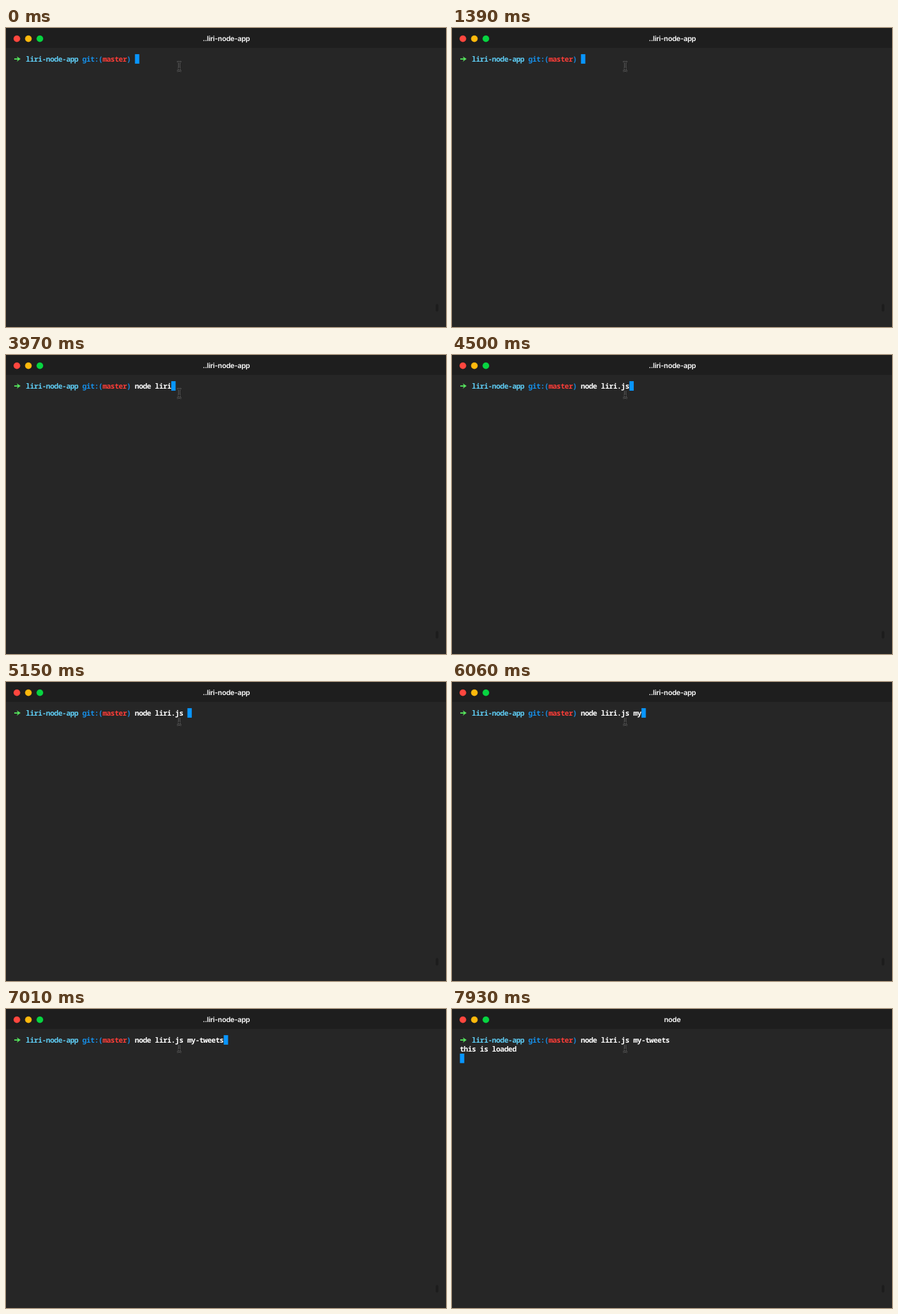
Animation, 639 px wide and 435 px high, one loop 8 s. Source, as an HTML page:

```html
<!DOCTYPE html>
<html lang="en">
<head>
<meta charset="utf-8">
<title>Terminal</title>
<style>
  html, body { margin: 0; width: 100%; height: 100%; overflow: hidden; background: #262626; }
  svg { display: block; width: 100%; height: 100%; }
  text { white-space: pre; text-rendering: geometricPrecision; }
  .mono { font: bold 10.6px "Noto Sans Mono", "DejaVu Sans Mono", monospace; letter-spacing: -0.5px; fill: #fff; }
  .title { font: 600 10.3px Inter, "Open Sans", sans-serif; letter-spacing: -0.25px; fill: #fff; text-anchor: middle; }
</style>
</head>
<body>
<svg viewBox="0 0 639 435" xmlns="http://www.w3.org/2000/svg">
  <defs>
    <clipPath id="beamClip"><rect id="beamBox" x="244" y="46" width="16" height="20"/></clipPath>
    <path id="beam" d="M248.6 49Q251.5 49 251.5 51.4V60Q251.5 62.4 248.6 62.4M254.4 49Q251.5 49 251.5 51.4M251.5 60Q251.5 62.4 254.4 62.4M249.8 58.6H253.2"/>
  </defs>
  <rect width="639" height="435" fill="#262626"/>
  <rect width="639" height="29" fill="#1e1e1e"/>
  <rect x="624" y="401.5" width="4" height="11" rx="2" fill="#1d1d1d"/>
  <g stroke="#000" stroke-opacity=".2" stroke-width=".6">
    <circle cx="15.8" cy="15.6" r="4.9" fill="#ff473f"/>
    <circle cx="32.5" cy="15.6" r="4.9" fill="#ffb90d"/>
    <circle cx="49.2" cy="15.6" r="4.9" fill="#08d441"/>
  </g>
  <text id="title" class="title" x="320" y="18.6"></text>

  <path d="M12 44.2H17L15.6 41.3L21.2 45.1L15.6 48.9L17 46H12Z" fill="#55e35c"/>
  <g clip-path="url(#beamClip)" fill="none">
    <use href="#beam" stroke="#858585" stroke-width="2.2"/>
    <use href="#beam" stroke="#151515" stroke-width="1.1"/>
  </g>
  <rect id="cursor" width="6.3" height="13.8" fill="#0896ff"/>
  <g id="lines"></g>
</svg>
<script>
  const LOOP = 8000, CELL = 5.86, LEFT = 11.5, ROW = 13.4, PROMPT = 30;
  const ENTER = 7150, OUTPUT = 7540;
  const COMMAND = "node liri.js my-tweets";

  // [time, characters typed so far]
  const KEYS = [
    [2170, 1], [2300, 3], [2420, 4], [2680, 5],
    [3720, 6], [3850, 8], [3970, 9],
    [4240, 10], [4370, 11], [4500, 12], [4890, 13],
    [5800, 14], [5930, 15],
    [6200, 16], [6330, 17], [6460, 18], [6590, 19], [6720, 20],
    [6880, 21], [7010, 22]
  ];

  const el = id => document.getElementById(id);
  const title = el("title"), cursor = el("cursor"), beamBox = el("beamBox");

  function addText(col, row, color, content = "") {
    const node = document.createElementNS("http://www.w3.org/2000/svg", "text");
    node.setAttribute("class", "mono");
    node.setAttribute("x", LEFT - 0.25 + col * CELL);
    node.setAttribute("y", 48.7 + row * ROW);
    node.style.fill = color;
    node.textContent = content;
    el("lines").append(node);
    return node;
  }

  addText(3, 0, "#5fcdf5", "liri-node-app");
  addText(17, 0, "#168fe8", "git:(");
  addText(22, 0, "#ff3d38", "master");
  addText(28, 0, "#168fe8", ")");
  const command = addText(PROMPT, 0, "#fff");
  const output = addText(0, 1, "#fff");

  function typedAt(t) {
    let count = 0;
    for (const [time, n] of KEYS) if (t >= time) count = n;
    return count;
  }

  function draw(t) {
    const count = typedAt(t);
    const entered = t >= ENTER, printed = t >= OUTPUT;
    command.textContent = COMMAND.slice(0, count);
    output.textContent = printed ? "this is loaded" : "";
    title.textContent = entered ? "node" : "..liri-node-app";

    const col = entered ? 0 : PROMPT + count;
    const row = printed ? 2 : entered ? 1 : 0;
    cursor.setAttribute("x", LEFT + col * CELL);
    cursor.setAttribute("y", 38.1 + row * ROW);

    // The typed text hides the top of the pointer.
    beamBox.setAttribute("y", count >= 11 ? 52 : 46);
  }

  function tick() {
    draw(performance.now() % LOOP);
    requestAnimationFrame(tick);
  }
  draw(0);
  requestAnimationFrame(tick);
</script>
</body>
</html>
```
